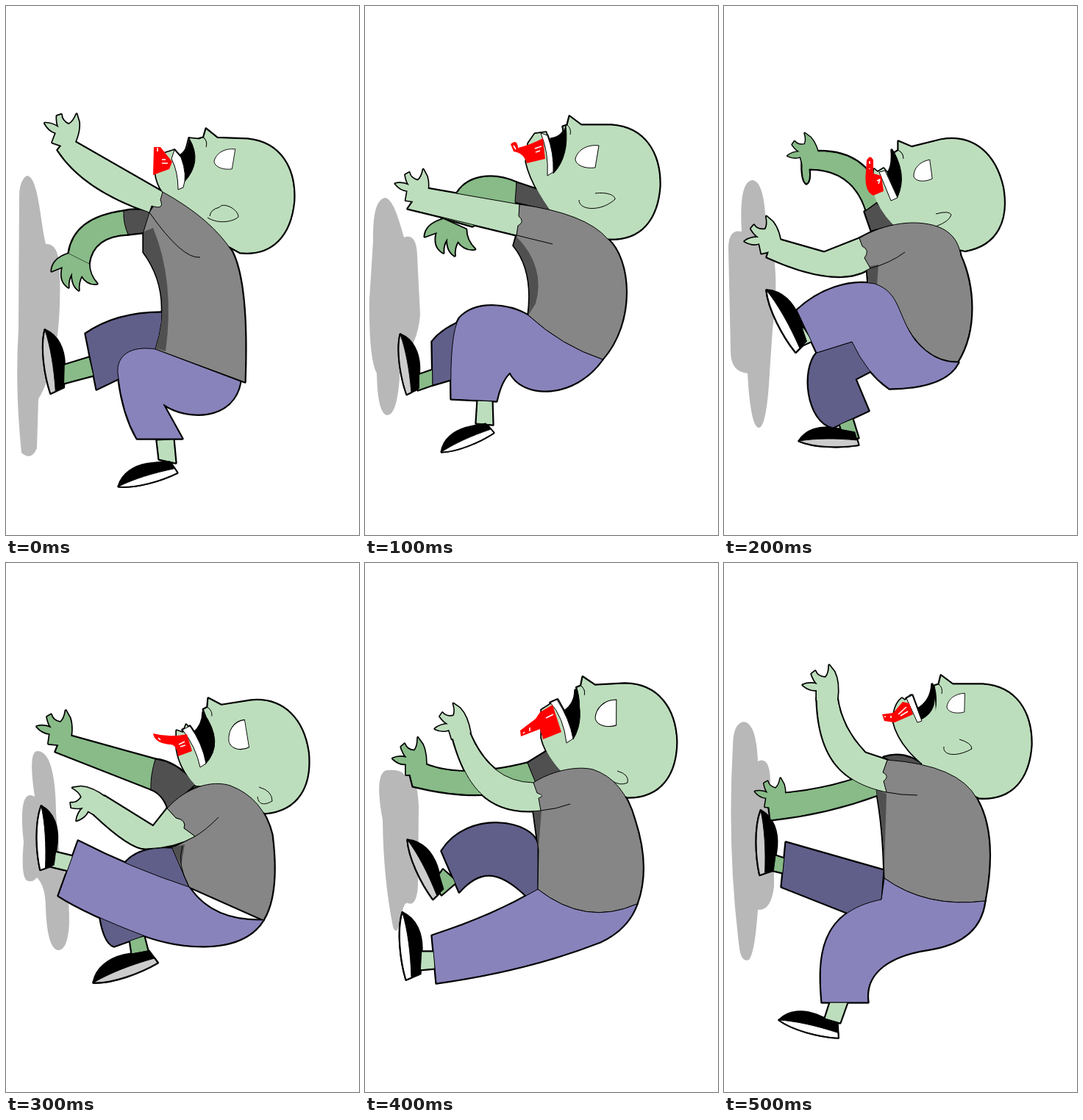
An HTML page that plays this animation: 480x720 px, repeating every 0.6 s.

```html
<!DOCTYPE html>
<html lang="en">
<head>
<meta charset="utf-8">
<title>Climbing zombie</title>
<style>
html, body { margin: 0; width: 100%; height: 100%; overflow: hidden; background: #fff; }
svg { display: block; width: 100%; height: 100%; color: #fff; }
.pose { stroke: #000; stroke-width: 1; stroke-linejoin: round; visibility: hidden; }
.pose.on { visibility: visible; }
.rim { stroke-width: 3.4; }
.shadow { fill: #b8b8b8; stroke: none; }
.skin { fill: #bddebd; }
.skin2 { fill: #88bb88; }
.shirt { fill: #868686; }
.shirt2 { fill: #505050; }
.pants { fill: #8883bb; }
.pants2 { fill: #605f8a; }
.fold { fill: #505050; stroke: none; }
.blood { fill: #f00; stroke: none; }
.shine { fill: none; stroke: #fff; stroke-width: 1.6; }
.line { fill: none; }
.white { fill: #fff; }
.back { color: #ccc; }
.bare { stroke: none; }
.rim .bare { stroke: #000; }
</style>
</head>
<body>
<svg viewBox="0 0 480 720">
<defs>
  <g id="head">
    <path d="M-9 14L-3 12L0 0L16 12H57C102 15 124 50 123 95C120 140 97 170 52 167L-27 127L-22 78Q0 50-9 14Z"/>
    <path class="line" d="M-3 12Q3 17 1 25"/>
  </g>
  <path id="eye" d="M0 0C3-12 16-20 32-18L27 12C12 14 0 8 0 0Z"/>
  <path id="hand" d="M14 2Q17-22 10-36L3-45Q3-33-2-28Q-13-29-16-37L-21-33Q-18-24-13-19Q-24-22-33-18Q-24-10-14-11L-14 3Z"/>
  <path id="claw" d="M-14-9Q-36-2-37 15L-22 9Q-27 29-14 37Q-15 26-9 17Q-10 34 0 41Q-1 30 4 21Q12 34 25 32Q14 20 14 5Z"/>
  <g id="shoe">
    <path d="M0 0C19 9 26 29 26 49L24 83L5 91C-3 64-7 24 0 0Z"/>
    <path fill="currentColor" d="M0 0C7 24 11 54 12 88L5 91C-3 64-7 24 0 0Z"/>
  </g>
</defs>

<g class="pose">
  <path class="shadow" d="M28 231C44 231 46 290 54 324Q72 322 73 360Q77 480 44 535L42 602Q34 620 21 608Q12 520 17 440L18 260Q18 238 28 231Z"/>
  <path class="skin2" d="M160 279Q92 288 85 337L113 351Q118 313 166 311Z"/>
  <use href="#claw" class="skin2 bare" transform="translate(99 346)"/>
  <path class="shirt2" d="M160 279Q180 273 210 284L192 308L166 311Q159 295 160 279Z"/>
  <path class="skin2" d="M74 490L113 478L119 503L74 515Z"/>
  <use href="#shoe" class="back" transform="translate(53 441) rotate(-2) scale(.95)"/>
  <path class="pants2" d="M212 417Q150 417 108 446L123 522L210 480Z"/>
  <use href="#head" class="skin" transform="translate(272 167) rotate(2)"/>
  <path class="skin bare" d="M213 253Q205 242 203 226L207 203L229 196L240 215L249 180L268 182L275 300Z"/>
  <path d="M249 180Q268 212 242 240Q243 215 234 205Q247 200 249 180Z"/>
  <path class="white" d="M229 196L238 206Q247 230 241 247L234 250Q234 225 225 208Z"/>
  <use href="#eye" class="white" transform="translate(283 211) scale(.9)"/>
  <path class="line" d="M274 288C290 298 310 293 316 287C316 277 296 266 290 274Q278 277 277 286"/>
  <path class="blood" d="M201 192H210L226 212L222 222L200 230Z"/>
  <path class="shine" d="M206 193V198M212 209H217M212 214H220"/>
  <path class="shirt" d="M213 253Q280 290 308 335Q330 380 325 512L203 467Q228 390 187 335V307L195 281Z"/>
  <path class="fold" d="M188 307L200 302Q230 375 217 470L204 466Q227 390 187 335Z"/>
  <path class="skin" d="M205 591L208 617L231 622L228 590Z"/>
  <use href="#shoe" transform="translate(153 654) rotate(-100) scale(.9)"/>
  <path class="pants" d="M203 467C170 462 150 475 152 500Q158 555 178 589H240L214 542C245 564 310 565 319 511Z"/>
  <path class="skin" d="M213 253L84 179L70 196Q105 250 195 281L198 272Q216 278 210 264Z"/>
  <use href="#hand" class="skin bare" transform="translate(77 188) rotate(21)"/>
  <path class="line" d="M195 281Q240 345 264 342"/>
</g>

<g class="pose">
  <path class="shadow" d="M27 261C38 262 46 290 53 315Q70 308 71 340L75 420Q72 460 48 485Q46 557 30 557Q17 555 16 500Q5 480 6 400L11 320Q10 264 27 261Z"/>
  <path class="skin2" d="M206 240C172 225 140 232 126 253L104 288L146 300L205 268Z"/>
  <use href="#claw" class="skin2 bare" transform="translate(122 299) scale(1.1 1)"/>
  <path class="shirt2" d="M206 240L236 250L254 279L204 267Z"/>
  <path class="skin2" d="M72 502L92 495V516L72 523Z"/>
  <use href="#shoe" class="back" transform="translate(48 447) rotate(-3) scale(.9)"/>
  <path class="pants2" d="M140 425Q105 438 91 457L92 516L130 505Z"/>
  <use href="#head" class="skin" transform="translate(278 150)"/>
  <path class="skin bare" d="M251 277Q225 240 219 212L222 187L231 174L246 172L256 210L275 180V285Z"/>
  <path d="M273 163Q278 205 256 228Q257 195 253 181Q270 178 273 163Z"/>
  <path class="white" d="M239 173L248 176Q257 200 256 226L248 231Q250 200 239 173Z"/>
  <use href="#eye" class="white" transform="translate(286 208)"/>
  <path class="line" d="M291 264C291 279 322 280 340 263C340 257 328 253 313 255"/>
  <path class="blood" d="M198 188Q207 180 208 193Q225 189 242 180L245 208L220 214Q216 200 202 198Z"/>
  <path class="shine" d="M202 190L205 195M231 194L240 191M232 199L238 197"/>
  <path class="shirt" d="M210 270Q300 282 330 317C362 345 368 430 323 481Q268 463 222 421Q230 360 202 326L206 312Z"/>
  <path class="fold" d="M206 314Q246 355 232 405L222 421Q230 360 202 326Z"/>
  <path class="skin" d="M153 537L151 568L174 570L173 538Z"/>
  <use href="#shoe" transform="translate(104 607) rotate(-107) scale(.83)"/>
  <path class="pants" d="M222 421C195 405 150 400 128 425Q115 445 117 535L179 538Q185 510 197 499C215 535 285 535 323 481Q268 463 222 421Z"/>
  <path class="skin" d="M210 270L78 247L58 276L206 312L208 299Q218 294 209 286Z"/>
  <use href="#hand" class="skin bare" transform="translate(69 264) rotate(10) scale(.95)"/>
  <path class="line" d="M206 312L255 324"/>
</g>

<g class="pose">
  <path class="shadow" d="M38 237Q55 237 57 300Q78 350 66 440L62 500Q58 574 47 574Q36 572 32 500Q9 498 9 470L6 330Q6 303 24 307Q20 240 38 237Z"/>
  <path class="skin2" d="M118 198Q195 192 215 262L193 278Q175 222 116 222Q118 239 112 242Q105 238 106 211Z"/>
  <use href="#hand" class="skin2 bare" transform="translate(118 211) rotate(-16) scale(.86)"/>
  <path class="shirt2" d="M191 280L208 268L230 298L200 306Z"/>
  <path class="skin2" d="M157 569L163 588H183L175 562Z"/>
  <use href="#shoe" class="back" transform="translate(102 592) rotate(-83) scale(.89)"/>
  <path class="pants2" d="M126 472C105 495 112 565 148 574L197 551L179 508L200 497L174 457Z"/>
  <use href="#head" class="skin" transform="translate(237 184) rotate(-14)"/>
  <path class="skin bare" d="M230 298Q208 275 202 250L204 222L209 226L217 221L228 235L238 215L262 300Z"/>
  <path d="M228 196Q250 228 236 260L222 228Q230 220 228 196Z"/>
  <path class="white" d="M211 226L219 224L236 261L227 265Z"/>
  <use href="#eye" class="white" transform="translate(258 232) rotate(-17) scale(.86)"/>
  <path class="line" d="M288 283Q306 278 309 284Q307 293 288 300"/>
  <path class="blood" d="M194 210Q199 201 203 210V228L214 231L217 252L203 258Q190 252 193 225Z"/>
  <path class="shine" d="M198 211V215M198 221V222M208 238L212 236L210 242"/>
  <path class="shirt" d="M184 316C220 295 260 290 290 300Q318 310 322 340C340 380 345 440 318 484Q270 485 240 420Q222 382 196 379L194 355Z"/>
  <path class="fold" d="M194 355L210 352L208 381L197 378Z"/>
  <path class="skin" d="M108 438L95 446L100 465L120 456Z"/>
  <use href="#shoe" transform="translate(58 387) rotate(-22) scale(1.02)"/>
  <path class="pants" d="M99 414C130 385 170 372 205 378C240 390 235 420 260 455Q286 486 319 485Q302 520 225 521Q194 500 174 457L126 472Z"/>
  <path class="skin" d="M184 316L136 335L66 315L58 342Q155 386 199 357L191 343Q199 332 188 327Z"/>
  <use href="#hand" class="skin bare" transform="translate(64 331) rotate(-12)"/>
  <path class="line" d="M199 357Q226 350 246 335"/>
</g>

<g class="pose">
  <path class="shadow" d="M42 256Q67 255 68 340L73 400Q86 430 86 490Q84 527 71 527Q56 525 54 470Q54 440 42 428Q36 436 28 432Q20 425 24 380Q16 305 39 318Q30 258 42 256Z"/>
  <path class="skin2" d="M203 267L77 232L67 257L197 308Z"/>
  <use href="#hand" class="skin2 bare" transform="translate(72 245) rotate(8)"/>
  <path class="shirt2" d="M203 267Q232 270 258 301L220 334Q213 314 197 308Q196 290 203 267Z"/>
  <path class="skin2" d="M168 512L171 532L193 528L188 508Z"/>
  <use href="#shoe" class="back" transform="translate(119 571) rotate(-104)"/>
  <path class="pants2" d="M226 388Q180 385 160 410L128 484Q134 518 147 522L200 503L249 441Z"/>
  <use href="#head" class="skin" transform="translate(275 184) rotate(-9)"/>
  <path class="skin bare" d="M258 303Q236 280 232 252V228L241 231L245 220L265 245L278 225L290 305Z"/>
  <path d="M268 203Q298 245 271 274Q268 255 256 231Q268 220 268 203Z"/>
  <path class="white" d="M240 227L250 222Q267 245 272 273L264 278Q258 250 240 227Z"/>
  <use href="#eye" class="white" transform="translate(303 243) rotate(-16) scale(.9 1.25)"/>
  <path class="line" d="M344 305Q362 310 362 324C350 331 343 328 342 318"/>
  <path class="blood" d="M200 232Q222 238 246 233L253 256L234 263Q232 246 222 247Q202 245 200 232Z"/>
  <path class="shine" d="M207 238L210 241M235 247L243 243M237 250L244 248"/>
  <path class="shirt" d="M219 334C245 305 280 295 305 303Q350 320 362 370Q372 450 350 486L249 441L226 388L257 372L242 361Q246 350 231 347Z"/>
  <path class="fold" d="M226 387L243 383L238 412Z"/>
  <path class="skin" d="M62 392L91 399L85 419L60 413Z"/>
  <use href="#shoe" transform="translate(48 331) rotate(4) scale(.95)"/>
  <path class="pants" d="M98 378Q170 415 249 441Q280 488 350 486C320 535 235 525 187 507Q110 478 71 453Z"/>
  <path class="skin" d="M219 334L200 358L134 317L120 343Q170 390 190 389Q230 388 257 372L242 361Q246 350 231 347Z"/>
  <use href="#hand" class="skin bare" transform="translate(128 331) rotate(-60)"/>
  <path class="line" d="M249 441Q232 410 240 385M257 372Q270 365 289 346"/>
</g>

<g class="pose">
  <path class="shadow" d="M30 282Q50 280 55 290Q70 280 73 330L72 440Q70 468 58 463Q52 460 48 490Q42 508 38 495Q25 430 24 350Q12 285 30 282Z"/>
  <path class="skin2" d="M221 272Q125 296 74 270L60 284L65 304Q170 330 232 298Z"/>
  <use href="#hand" class="skin2 bare" transform="translate(69 285) scale(.95 1.05)"/>
  <path class="shirt2" d="M221 272L250 254L270 282L232 299Z"/>
  <path class="skin2" d="M94 434L106 417L125 434L104 452Z"/>
  <use href="#shoe" class="back" transform="translate(58 377) rotate(-20) scale(.96)"/>
  <path class="pants2" d="M104 392C140 335 230 350 235 384V444L220 454C180 415 155 418 128 448Z"/>
  <use href="#head" class="skin" transform="translate(296 155) rotate(-3)"/>
  <path class="skin bare" d="M267 284Q245 260 240 238V200L262 186L278 215L291 190L295 288Z"/>
  <path d="M286 173Q300 212 283 240Q280 220 271 202Q286 192 286 173Z"/>
  <path class="white" d="M252 190L261 186Q278 212 283 239L274 245Q270 210 252 190Z"/>
  <use href="#eye" class="white" transform="translate(313 211) rotate(-8) scale(1 1.15)"/>
  <path class="line" d="M343 283Q360 288 357 299Q347 304 335 296"/>
  <path class="blood" d="M211 228L232 212L238 203L255 193L267 230L242 240L238 226L212 236Z"/>
  <path class="shine" d="M215 232L217 230M224 224V229M246 211L256 206"/>
  <path class="shirt" d="M229 299C250 285 285 275 310 281Q352 295 367 350Q388 415 370 464Q300 495 235 444L236 390L229 338Z"/>
  <path class="fold" d="M229 338L240 337L236 388Z"/>
  <path class="skin" d="M73 529H94L95 552L73 554Z"/>
  <use href="#shoe" transform="translate(51 476)"/>
  <path class="pants" d="M235 444Q175 480 91 507L97 572Q220 555 320 516Q358 498 370 464Q300 495 235 444Z"/>
  <path class="skin" d="M229 299Q170 298 142 230L118 234C135 300 165 345 239 337L236 320Q246 317 234 313Z"/>
  <use href="#hand" class="skin bare" transform="translate(130 233) rotate(-17) scale(.95)"/>
  <path class="line" d="M239 337Q260 335 279 328"/>
</g>

<g class="pose">
  <path class="shadow" d="M27 216Q44 218 46 270Q63 262 63 300L68 380V440Q64 474 46 472Q42 530 34 540Q24 544 21 525Q4 390 12 250Q12 218 27 216Z"/>
  <path class="skin2" d="M215 280Q150 308 74 314L60 325L63 350Q140 342 212 315Z"/>
  <use href="#hand" class="skin2 bare" transform="translate(68 331) rotate(9) scale(.87)"/>
  <path class="shirt2" d="M217 264Q245 255 270 274L240 277Z"/>
  <path class="skin2" d="M64 396L82 402L80 422L64 418Z"/>
  <use href="#shoe" class="back" transform="translate(50 337) rotate(4) scale(.96)"/>
  <path class="pants2" d="M84 380L217 418L214 458L174 479L78 441Z"/>
  <use href="#head" class="skin" transform="translate(295 153)"/>
  <path class="skin bare" d="M268 272Q237 245 230 215Q231 192 242 184L246 187L254 180L266 208L287 185L292 276Z"/>
  <path d="M283 165Q294 200 268 213L263 199Q282 188 283 165Z"/>
  <path class="white" d="M248 184L256 180L269 215L263 217Z"/>
  <use href="#eye" class="white" transform="translate(303 196) rotate(-8) scale(.84)"/>
  <path class="line" d="M299 250C297 263 318 264 337 253Q337 245 320 240"/>
  <path class="blood" d="M215 206L230 204L243 189L252 191L257 206L232 217L218 215Z"/>
  <path class="shine" d="M219 208V210M227 208V211M237 206L248 196M240 208L250 202"/>
  <path class="shirt" d="M222 268Q320 275 344 321Q372 370 355 460Q275 470 218 429Q217 360 207 309Z"/>
  <path class="fold" d="M207 308L221 314L218 415Q217 360 207 308Z"/>
  <path class="skin" d="M144 598L137 620L158 626L168 598Z"/>
  <use href="#shoe" transform="translate(75 622) rotate(-70) scale(.92)"/>
  <path class="pants" d="M218 429Q275 470 355 460Q348 515 280 526C230 533 190 555 196 598H133C128 540 128 475 214 458Z"/>
  <path class="skin" d="M222 268L192 258Q160 225 154 183L126 184C128 270 165 300 221 312L217 297Q226 290 216 285Z"/>
  <use href="#hand" class="skin bare" transform="translate(140 184)"/>
  <path class="line" d="M221 312Q240 316 263 316"/>
</g>
</svg>
<script>
const poses = [...document.querySelectorAll('.pose')];

// A thicker copy behind the figure leaves a bold rim around its silhouette.
for (const pose of poses) {
  const rim = pose.cloneNode(true);
  rim.setAttribute('class', 'rim');
  rim.querySelectorAll('.shadow, .blood, .shine, .fold, .line').forEach(part => part.remove());
  pose.firstElementChild.after(rim);
}

function tick() {
  const now = Math.floor(performance.now() / 100) % poses.length;
  poses.forEach((pose, i) => pose.classList.toggle('on', i === now));
  requestAnimationFrame(tick);
}
tick();
</script>
</body>
</html>
```
